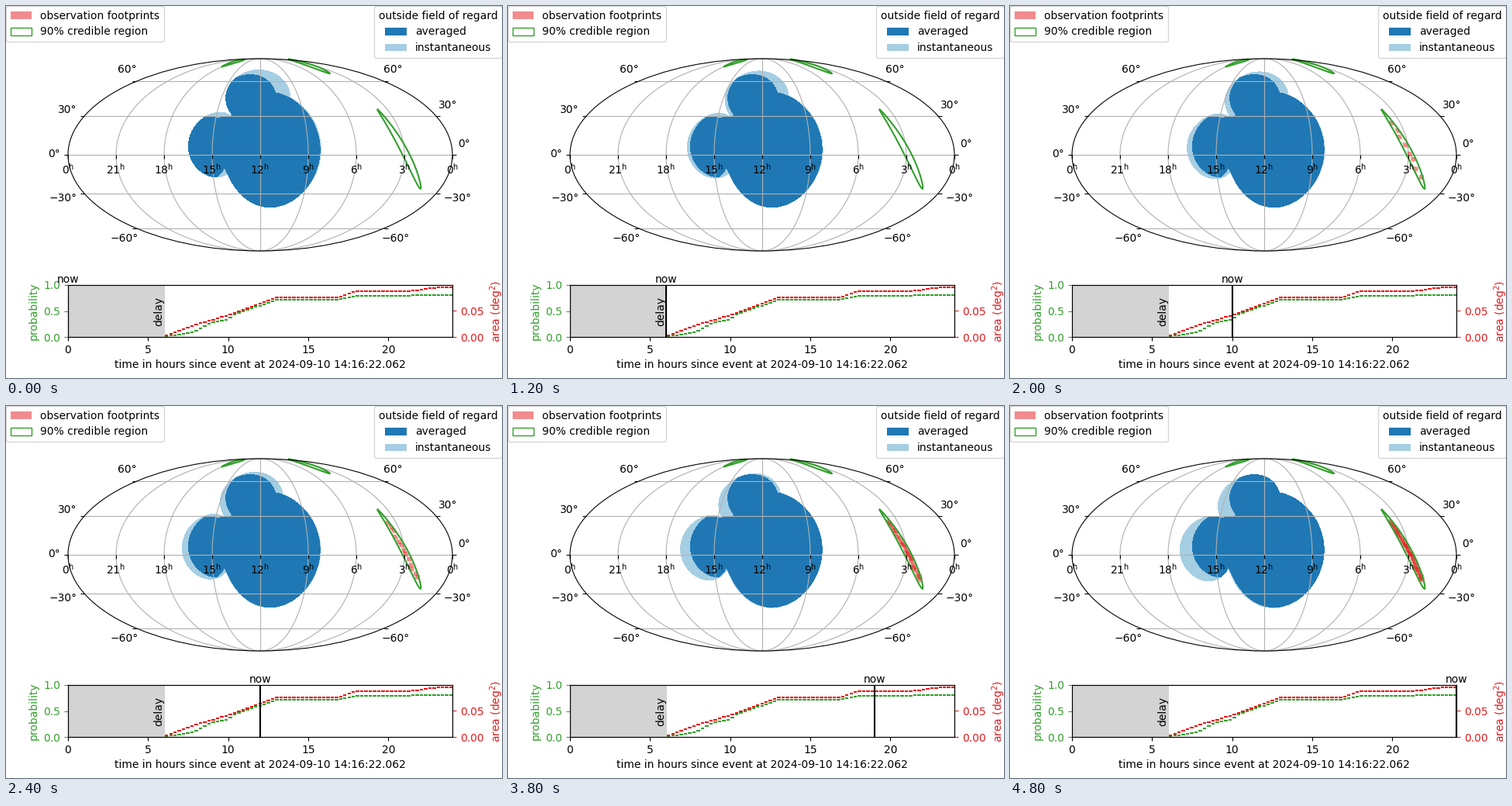
Write a matplotlib script that moves like this. It is 640 by 480 pixels and loops after 5 s.

```python
import numpy as np
import matplotlib.pyplot as plt
from matplotlib.animation import FuncAnimation
from matplotlib.colors import ListedColormap
from matplotlib.patches import Ellipse, Patch, Polygon

BLUE, LIGHT, GREEN, RED = "#1f78b4", "#a6cee3", "#33a02c", "#e31a1c"
HOURS = 24
CX, CY, RX, RY = 328, 192, 248, 124  # sky map in pixels

plt.rcParams.update({"font.family": "DejaVu Sans", "font.size": 10})
rng = np.random.default_rng(4)
fig = plt.figure(figsize=(6.4, 4.8), dpi=100)
sky = fig.add_axes([0, 0, 1, 1])
sky.axis("off")


def sin_declination(theta):
    return (2 * theta + np.sin(2 * theta)) / np.pi


THETA = np.linspace(-np.pi / 2, np.pi / 2, 721)
DEC = np.degrees(np.arcsin(np.clip(sin_declination(THETA), -1, 1)))


def mollweide(lon, dec):
    """Pixel position of degrees; longitude grows to the left from the centre."""
    theta = np.interp(dec, DEC, THETA)
    return CX - RX * np.asarray(lon) / 180 * np.cos(theta), CY - RY * np.sin(theta)


# Field of regard, sampled once per pixel
X0, X1, Y0, Y1 = 200, 420, 75, 270
px, py = np.meshgrid(np.arange(X0, X1) + 0.5, np.arange(Y0, Y1) + 0.5)
theta = np.arcsin((CY - py) / RY)
sin_dec = sin_declination(theta)
cos_dec = np.sqrt(1 - sin_dec**2)
lon = np.pi * (CX - px) / RX / np.cos(theta)

# radius, (lon, dec) at the start, (lon, dec) at the end
AVOIDED = [
    (46.2, (-11.0, 4.7), (-10.1, 4.3)),
    (25.3, (42.4, 8.0), (54.0, 4.9)),
    (26.0, (2.7, 46.8), (16.7, 41.5)),
]


def blocked(hour):
    mask = np.zeros(px.shape, bool)
    for radius, start, end in AVOIDED:
        clon, cdec = np.radians(start + np.subtract(end, start) * hour / HOURS)
        cos_sep = np.sin(cdec) * sin_dec + np.cos(cdec) * cos_dec * np.cos(lon - clon)
        mask |= cos_sep > np.cos(np.radians(radius))
    return mask


instant = [blocked(h) for h in range(HOURS + 1)]
averaged = np.all(instant, axis=0)
levels = [np.where(averaged, 2, mask) for mask in instant]
regard = sky.imshow(levels[0], extent=(X0, X1, Y1, Y0), vmin=0, vmax=2,
                    cmap=ListedColormap(["#ffffff00", LIGHT, BLUE]),
                    interpolation="nearest", aspect="auto", zorder=1)
sky.set(xlim=(0, 640), ylim=(480, 0))

# Graticule, frame and ticks
grid = dict(color="#b0b0b0", lw=0.8, zorder=2)
tick = dict(color="black", lw=0.8, zorder=5, solid_capstyle="butt")
TICK = 4.9
sky.add_patch(Ellipse((CX, CY), 2 * RX, 2 * RY, fill=False, lw=0.8, zorder=5))

for meridian in range(-180, 181, 45):
    if abs(meridian) < 180:
        sky.plot(*mollweide(meridian, DEC), **grid)
    x, _ = mollweide(meridian, 0)
    hour = (12 + meridian // 15) % 24
    sky.plot([x, x], [CY, CY + TICK], **tick)
    sky.text(x, 216.5, rf"{hour}$^\mathregular{{h}}$", ha="center", va="baseline", zorder=6)

for dec in range(-60, 90, 30):
    label = f"{dec}°".replace("-", "\u2212")
    half_width = {2: 8, 3: 12.3, 4: 18}[len(label)]
    for side in (-1, 1):
        edge, y = mollweide(-180 * side, dec)
        sky.plot([CX, edge], [y, y], **grid)
        sky.plot([edge, edge + side * TICK], [y, y], **tick)
        dx = half_width + 10 if abs(dec) <= 30 else 0.58 * half_width + 4
        dy = -7.1 * dec / 30 - 1
        if side > 0 and dec in (0, 30):
            dx, dy = 15.5, -13.7
        sky.text(edge + side * dx, y + dy, label, ha="center", va="center", zorder=6)


def along(s, start, end, bow, offset=0):
    """Points on an arc from start to end, shifted sideways by offset."""
    start, end = np.array(start), np.array(end)
    dx, dy = end - start
    normal = np.array([dy, -dx]) / np.hypot(dx, dy)
    shift = bow * 4 * s * (1 - s) + offset
    return start + np.outer(s, end - start) + np.outer(shift, normal)


def lens(start, end, bow, width):
    s = np.linspace(0, 1, 60)
    half = width / 2 * np.sqrt(np.abs(np.sin(np.pi * s**1.4)))
    outline = np.vstack([along(s, start, end, bow, half), along(s, start, end, bow, -half)[::-1]])
    sky.add_patch(Polygon(outline, fill=False, ec=GREEN, lw=1.5, zorder=4))


MAIN = ((479, 133), (535, 236), 4.8)
lens(*MAIN, width=8.4)
lens((278, 78.5), (308, 69), 0.8, width=2.6)
lens((364, 68.5), (418, 87), 1.5, width=3.4)

# Observed tiles hop along the main region by the golden ratio
corners = np.array([(-2.9, -2.9), (2.9, -2.9), (2.9, 2.9), (-2.9, 2.9)])
tiles = []
for k in range(39):
    s = 0.15 + 0.75 * ((0.96 + 0.618 * k) % 1)
    center = along(np.array([s]), *MAIN, rng.uniform(-1.5, 1.5))[0]
    shear = np.array([[1, 0.12], [(CY - center[1]) / 90 + 0.1, 1]])
    tile = Polygon(corners @ shear + center, fc=RED, ec="none", alpha=0.5, zorder=3)
    tiles.append((6.6 + 0.45 * k, sky.add_patch(tile)))

# Timeline
ax = fig.add_axes([0.125, 0.11, 0.775, 0.1401])
ax.set(xlim=(0, HOURS), ylim=(0, 1), xticks=range(0, 24, 5), yticks=[0, 0.5, 1])
ax.set_xlabel("time in hours since event at 2024-09-10 14:16:22.062")
ax.set_ylabel("probability", color=GREEN)
ax.tick_params(axis="y", colors=GREEN)
right = ax.twinx()
right.set(ylim=(0, 0.0997), yticks=[0, 0.05])
right.set_yticklabels(["0.00", "0.05"])
right.set_ylabel("area (deg$^2$)", color=RED)
right.tick_params(axis="y", colors=RED)

ax.axvspan(0, 6.05, color="lightgray", lw=0, zorder=0.5)
ax.text(6, 0.5, "delay", rotation=90, ha="right", va="center")

# Key points (hour, height) of both cumulative curves
PROBABILITY = [(6, 0.01), (7.8, 0.1), (8.7, 0.26), (9.9, 0.345), (10.2, 0.42), (12.9, 0.717),
               (16.8, 0.717), (17.8, 0.79), (21.2, 0.79), (21.4, 0.807)]
AREA = [(6, 0.02), (8, 0.25), (10, 0.43), (13, 0.762), (16.8, 0.762), (17.8, 0.881),
        (21.2, 0.881), (23, 0.955)]
starts = np.arange(6.05, HOURS, 0.265)
ends = np.minimum(starts + 0.215, HOURS)
for curve, color in ((PROBABILITY, GREEN), (AREA, RED)):
    ax.hlines(np.interp(starts, *zip(*curve)), starts, ends, color=color, lw=1.5, zorder=2)

now_line = ax.axvline(0, color="black", lw=1.5, zorder=3)
now_text = ax.text(0, 1, "now", ha="center", va="bottom")

# Legends
fig.legend(handles=[Patch(fc=RED, ec="none", alpha=0.5, label="observation footprints"),
                    Patch(fc="none", ec=GREEN, label="90% credible region")],
           loc="upper left", bbox_to_anchor=(0, 1), borderaxespad=0)
fig.legend(handles=[Patch(fc=BLUE, label="averaged"), Patch(fc=LIGHT, label="instantaneous")],
           title="outside field of regard", loc="upper right",
           bbox_to_anchor=(1, 1), borderaxespad=0)


def update(hour):
    regard.set_data(levels[hour])
    for first, tile in tiles:
        tile.set_visible(hour >= first)
    now_line.set_xdata([hour, hour])
    now_text.set_x(hour)
    return regard, now_line, now_text


anim = FuncAnimation(fig, update, frames=HOURS + 1, interval=200, repeat=True, repeat_delay=0)
plt.show()
```
